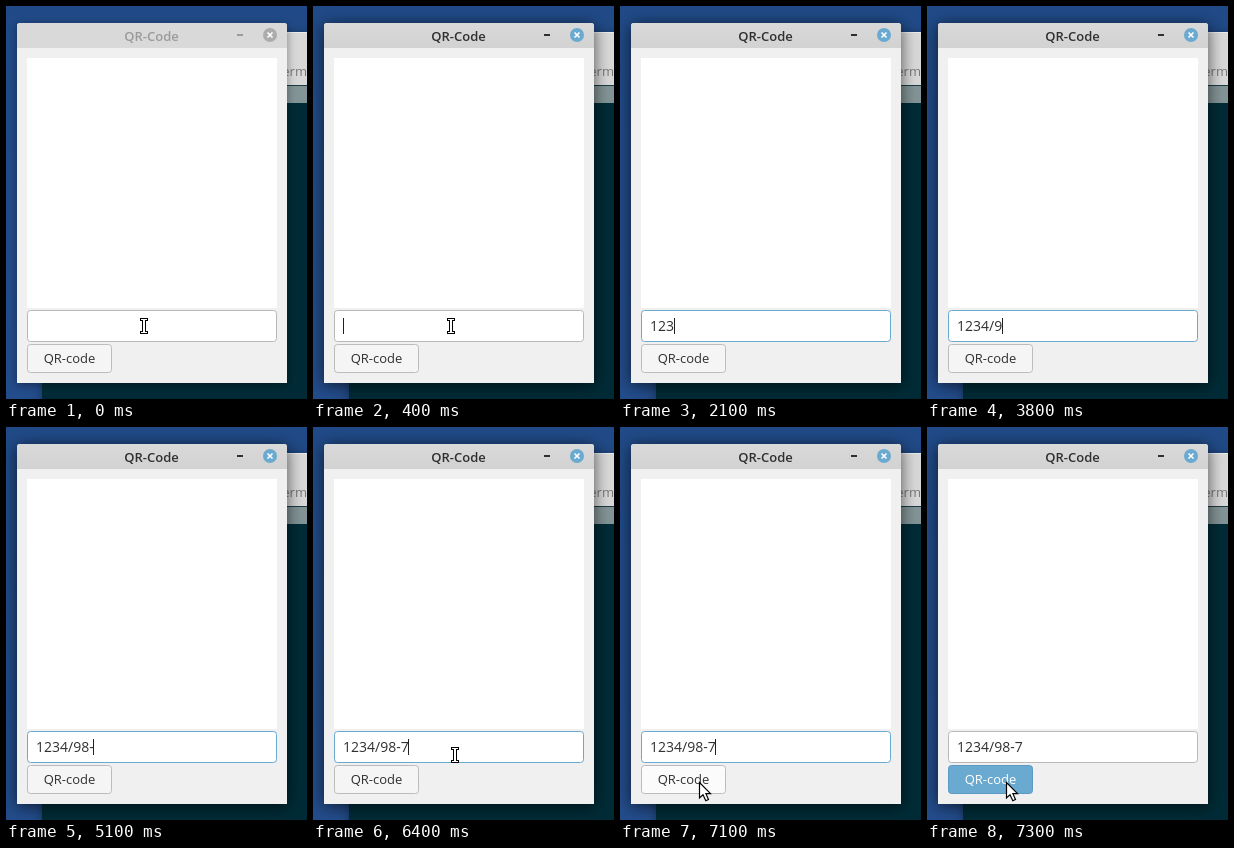
An HTML page with a canvas that plays this animation: 301 px wide and 393 px high, repeating every 8 s.

```html
<!DOCTYPE html>
<html lang="en">
<head>
<meta charset="utf-8">
<title>Code window</title>
<style>
html, body { margin: 0; height: 100%; overflow: hidden; background: #204a87; }
canvas { display: block; }
</style>
</head>
<body>
<canvas id="stage" width="301" height="393"></canvas>
<script>
const ctx = document.getElementById('stage').getContext('2d');
const LOOP = 8000, STEP = 100;
const FAMILY = '"Open Sans", "Noto Sans", sans-serif';
const BLUE = [106, 169, 208], GREY = [184, 184, 184];
const TYPED = '1234/98-7';
const KEY_TIMES = [1500, 1700, 2100, 2400, 2800, 3800, 4700, 5100, 5300];

// Pointer path after typing: time, x, y
const PATH = [
  [6400, 142, 328], [6500, 137, 340], [6600, 125, 358],
  [6700, 107, 368], [6800, 92, 367], [6900, 84, 361], [7000, 79, 355]
];

const clamp = v => Math.max(0, Math.min(1, v));
const mix = (a, b, k) => `rgb(${a.map((v, i) => Math.round(v + (b[i] - v) * k))})`;

function rect(x, y, w, h, color) {
  ctx.fillStyle = color;
  ctx.fillRect(x, y, w, h);
}

function box(x, y, w, h, fill, border) {
  ctx.beginPath();
  ctx.roundRect(x + 0.5, y + 0.5, w - 1, h - 1, 3);
  ctx.fillStyle = fill;
  ctx.fill();
  ctx.strokeStyle = border;
  ctx.lineWidth = 1;
  ctx.stroke();
}

function label(str, x, y, color, font, align = 'left') {
  ctx.font = `${font} ${FAMILY}`;
  ctx.textAlign = align;
  ctx.fillStyle = color;
  ctx.fillText(str, x, y);
}

function vertical(y0, y1, from, to) {
  const g = ctx.createLinearGradient(0, y0, 0, y1);
  g.addColorStop(0, from);
  g.addColorStop(1, to);
  return g;
}

function castShadow(alpha, blur, draw) {
  ctx.save();
  ctx.shadowColor = `rgba(0,0,0,${alpha})`;
  ctx.shadowBlur = blur;
  ctx.shadowOffsetY = 2;
  draw();
  ctx.restore();
}

function drawDesktop() {
  rect(0, 0, 301, 393, vertical(0, 393, '#204a87', '#234c8b'));
  castShadow(0.35, 10, () => rect(36, 26, 300, 400, '#d8d8d8'));
  rect(36, 26, 265, 1, '#ececec');
  label('Term', 301, 70, '#777', '13px', 'right');
  rect(36, 79, 265, 1, '#1b3a43');
  rect(36, 80, 265, 17, '#839496');
  rect(36, 97, 265, 296, '#002b36');
}

function drawWindow(active) {
  castShadow(active ? 0.65 : 0.4, active ? 16 : 10, () => {
    ctx.beginPath();
    ctx.roundRect(11, 17, 270, 360, [3, 3, 0, 0]);
    ctx.fillStyle = '#f0f0f0';
    ctx.fill();
  });
  ctx.beginPath();
  ctx.roundRect(11, 17, 270, 25, [3, 3, 0, 0]);
  ctx.fillStyle = active ? vertical(17, 42, '#d9d9d9', '#d2d2d2') : '#d9d9d9';
  ctx.fill();

  const ink = active ? '#303030' : '#9b9b9b';
  label('QR-Code', 145.5, 35, ink, '600 13px', 'center');
  rect(231, 28, 6, 2, ink);

  ctx.beginPath();
  ctx.arc(264, 29, 7, 0, 7);
  ctx.fillStyle = active ? mix(BLUE, BLUE, 0) : '#acacac';
  ctx.fill();
  ctx.beginPath();
  ctx.moveTo(261.5, 26.5);
  ctx.lineTo(266.5, 31.5);
  ctx.moveTo(266.5, 26.5);
  ctx.lineTo(261.5, 31.5);
  ctx.strokeStyle = '#fff';
  ctx.lineWidth = 1.6;
  ctx.stroke();

  rect(21, 52, 250, 250, '#fff');
}

function drawEntry(t) {
  const focus = t < 7200 ? clamp((t - 400) / 200) : clamp((7300 - t) / 200);
  box(21, 304, 250, 32, '#fff', mix(GREY, BLUE, focus));
  const text = TYPED.slice(0, KEY_TIMES.filter(k => k <= t).length);
  label(text, 30, 325, '#303030', '14px');
  const blinkOff = t >= 1200 && t < 1500;
  if (t >= 400 && t < 7200 && !blinkOff) {
    rect(30 + Math.floor(ctx.measureText(text).width), 312, 1, 16, '#202020');
  }
}

function drawButton(t) {
  const pressed = t >= 7200, hover = t >= 6900;
  const fill = pressed ? mix(BLUE, BLUE, 0) : hover ? '#fbfbfb' : '#f5f5f5';
  box(21, 338, 85, 29, fill, pressed ? '#5b9ac2' : '#bcbcbc');
  label('QR-code', 63.5, 357, pressed ? '#fff' : '#303030', '13px', 'center');
}

function drawBeam(x, y) {
  rect(x - 4, y - 8, 8, 3, '#000');
  rect(x - 4, y + 5, 8, 3, '#000');
  rect(x - 2, y - 8, 4, 16, '#000');
  rect(x - 3, y - 7, 6, 1, '#fff');
  rect(x - 3, y + 6, 6, 1, '#fff');
  rect(x - 1, y - 7, 2, 14, '#fff');
}

function drawArrow(x, y) {
  ctx.save();
  ctx.translate(x + 0.5, y + 0.5);
  const shape = new Path2D('M0 0V15.5L3.5 12.3L6.3 18.3L9 17L6.4 11.2H11Z');
  ctx.fillStyle = '#fff';
  ctx.fill(shape);
  ctx.strokeStyle = '#000';
  ctx.lineWidth = 1.2;
  ctx.stroke(shape);
  ctx.restore();
}

function drawPointer(t) {
  if (t < 1500) return drawBeam(138, 320);
  if (t < 6400) return;
  const [, x, y] = PATH.filter(p => p[0] <= t).pop();
  if (t < 6500) drawBeam(x, y);
  else drawArrow(x, y);
}

function frame(now) {
  const t = Math.floor((now % LOOP) / STEP) * STEP;
  drawDesktop();
  drawWindow(t >= 400);
  drawEntry(t);
  drawButton(t);
  drawPointer(t);
  requestAnimationFrame(frame);
}
requestAnimationFrame(frame);
</script>
</body>
</html>
```
